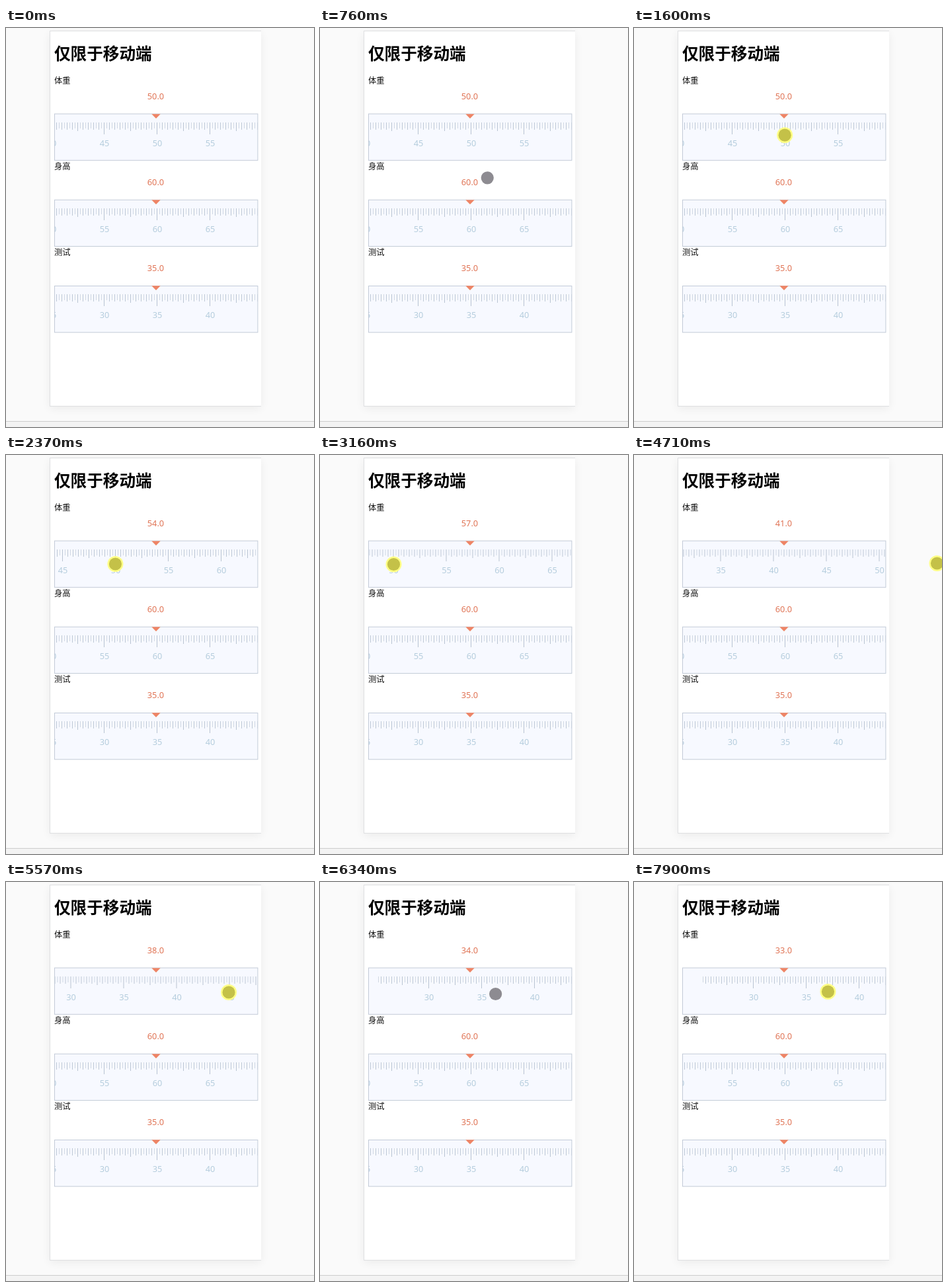
Animation, 466 px wide and 604 px high, one loop 8 s. Source, as an HTML page:

```html
<!DOCTYPE html>
<html lang="zh-CN">
<head>
<meta charset="utf-8">
<title>Ruler picker</title>
<style>
html, body { margin: 0; width: 100%; height: 100%; overflow: hidden; background: #fafafa; }
svg { display: block; width: 466px; height: 604px; }
text { font-family: "Noto Sans", "Noto Sans CJK SC", "Noto Sans CJK", sans-serif; font-size: 12.8px; }
.cjk { font-family: "Noto Sans CJK SC", "Noto Sans CJK", sans-serif; font-size: 12.3px; fill: #111; }
.title { font-size: 24.6px; font-weight: 700; fill: #000; }
.value { fill: #e07455; text-anchor: middle; }
.num { fill: #b5cddd; text-anchor: middle; }
</style>
</head>
<body>
<svg id="stage" viewBox="0 0 466 604">
  <defs>
    <filter id="soft" x="-20%" y="-20%" width="140%" height="140%"><feGaussianBlur stdDeviation="7"/></filter>
    <clipPath id="window"><rect x="74" y="131" width="306.5" height="69"/></clipPath>
  </defs>
  <rect width="466" height="604" fill="#fafafa"/>
  <rect x="66" y="8" width="320" height="568" fill="#000" opacity=".06" filter="url(#soft)"/>
  <rect x="66" y="4" width="320" height="569" fill="#dedfe1"/>
  <rect x="67" y="5" width="319" height="567" fill="#fff"/>
  <rect y="595" width="466" height="9" fill="#f3f3f3"/>
  <rect y="595" width="466" height="1" fill="#cdcdcd"/>
  <text class="cjk title" x="73" y="47.5">仅限于移动端</text>
  <g id="rulers"></g>
  <g id="cursor">
    <circle id="halo" r="12" fill="#ffff80"/>
    <circle id="dot" r="9.6"/>
  </g>
</svg>
<script>
const NS = "http://www.w3.org/2000/svg";
const LOOP = 8000, UNIT = 16, ORIGIN = 228.5, LAG = 40;
const $ = id => document.getElementById(id);

function add(parent, tag, attrs, text) {
  const el = document.createElementNS(NS, tag);
  for (const k in attrs) el.setAttribute(k, attrs[k]);
  if (text !== undefined) el.textContent = text;
  return parent.appendChild(el);
}

// Ticks stand every quarter unit; every fifth unit has a number.
function drawScale(strip, min, max) {
  for (let i = 1; i <= (max - min) * 4; i++) {
    const x = i * 4, major = i % 20 === 0, half = i % 10 === 0;
    const end = major ? 161 : half ? 156 : i % 2 ? 152 : 154;
    add(strip, "rect", {
      x: x - 0.5, y: 143, width: 1, height: end - 143,
      fill: half ? "#b9c4d2" : i % 2 ? "#d0d8e3" : "#bdc8d5"
    });
    if (major) add(strip, "text", { class: "num", x: x + 0.5, y: 179 }, min + i / 4);
  }
}

// The needle sits slightly left of the scale's origin.
const nearest = v => Math.round(v - 0.09);

function makeRuler(label, row, min, max, start) {
  const g = add($("rulers"), "g", { transform: `translate(0 ${row * 130})` });
  add(g, "text", { class: "cjk", x: 73, y: 84 }, label);
  const value = add(g, "text", { class: "value", x: 226.5, y: 108 });
  add(g, "rect", {
    x: 73.5, y: 130 + row * 0.25, width: 307.4, height: 70.3, fill: "#f7f9ff", stroke: "#c3cbd8"
  });
  const strip = add(add(g, "g", { "clip-path": "url(#window)" }), "g", {});
  drawScale(strip, min, max);
  add(g, "path", { d: "M220.3 130.3H233.7L227 136.9Z", fill: "#ee8465" });
  const set = v => {
    const x = Math.round((min - v) * UNIT * 2) / 2 + ORIGIN;
    strip.setAttribute("transform", `translate(${x} 0)`);
    value.textContent = nearest(v).toFixed(1);
  };
  set(start);
  return set;
}

const setWeight = makeRuler("体重", 0, 25, 75, 50);
makeRuler("身高", 1, 45, 80, 60);
makeRuler("测试", 2, 20, 55, 35);

// Press and release times
const PRESSES = [[1370, 3790], [4260, 4800], [5340, 5890], [6510, 7110], [7900, LOOP]];

// Pointer moves: start, end, and where they lead; it rests in between.
const ENTRY = { x: 368, y: 569, at: 70 };
const MOVES = [
  [70, 1220, 231.5, 162], [1560, 2370, 165.5, 165], [2370, 3160, 111.5, 165.5],
  [3790, 4020, 204, 164], [4330, 4650, 458.5, 164], [4800, 5190, 282, 168],
  [5340, 5810, 394, 166], [5890, 6340, 265.5, 169.5], [6340, 6730, 295, 167],
  [7110, 7300, 356, 164], [7300, 7510, 293.5, 166]
];

const isPressed = t => PRESSES.some(([a, b]) => t >= a && t < b);
const easeOut = p => 1 - (1 - p) ** 2;

function pointer(t) {
  let { x, y } = ENTRY;
  for (const [start, end, toX, toY] of MOVES) {
    if (t < start) break;
    const p = Math.min(1, (t - start) / (end - start));
    const k = isPressed(start) ? p : easeOut(p);
    x += (toX - x) * k;
    y += (toY - y) * k;
  }
  return { x, y };
}

// Dragging shifts the scale with the pointer; letting go snaps it to a whole unit.
function weightAt(t) {
  let weight = 50;
  for (const [down, up] of PRESSES) {
    if (t < down) break;
    const seen = Math.max(down, Math.min(t, up) - LAG);
    weight -= (pointer(seen).x - pointer(down).x) / UNIT;
    if (t >= up) weight = nearest(weight);
  }
  return weight;
}

function render(t) {
  const { x, y } = pointer(t), pressed = isPressed(t);
  setWeight(weightAt(t));
  $("cursor").setAttribute("visibility", t < ENTRY.at ? "hidden" : "visible");
  $("cursor").setAttribute("transform", `translate(${x} ${y})`);
  $("halo").setAttribute("opacity", pressed ? 0.95 : 0);
  $("dot").setAttribute("fill", pressed ? "#c4c148" : "#8d8b91");
}

const began = performance.now();
function frame() {
  render((performance.now() - began) % LOOP);
  requestAnimationFrame(frame);
}
frame();
</script>
</body>
</html>
```
